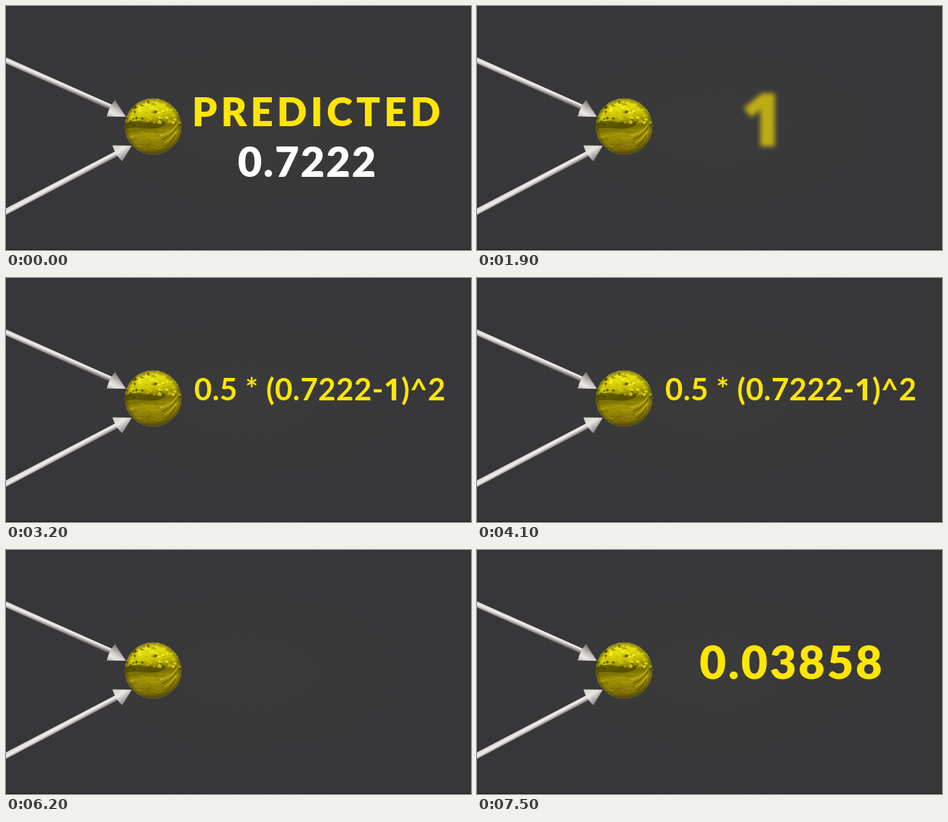
Animation, 640 px wide and 337 px high, one loop 8.5 s. Source, as an HTML page:

```html
<!DOCTYPE html>
<html lang="en">
<head>
<meta charset="utf-8">
<title>Prediction loss</title>
<style>
  html, body { margin: 0; width: 100%; height: 100%; overflow: hidden; background: #363538; }
  svg { display: block; width: 100vw; height: 100vh; }
</style>
</head>
<body>
<svg id="stage" viewBox="0 0 640 337" preserveAspectRatio="none">
  <defs>
    <radialGradient id="bg" cx=".52" cy=".5" r=".6">
      <stop offset="0" stop-color="#3b3b3b"/>
      <stop offset=".55" stop-color="#383739"/>
      <stop offset="1" stop-color="#363639"/>
    </radialGradient>
    <linearGradient id="rodA" gradientUnits="userSpaceOnUse" x1="74.500" y1="104.200" x2="71.500" y2="111.200">
      <stop offset="0" stop-color="#dedada"/>
      <stop offset=".3" stop-color="#f3f0ef"/>
      <stop offset=".55" stop-color="#cfcac9"/>
      <stop offset="1" stop-color="#756d6d"/>
    </linearGradient>
    <linearGradient id="rodB" gradientUnits="userSpaceOnUse" x1="74" y1="241.500" x2="77.800" y2="248.500">
      <stop offset="0" stop-color="#dedada"/>
      <stop offset=".35" stop-color="#f3f0ef"/>
      <stop offset=".6" stop-color="#cbc5c4"/>
      <stop offset="1" stop-color="#786f6f"/>
    </linearGradient>
    <linearGradient id="coneA" gradientUnits="userSpaceOnUse" x1="158" y1="139" x2="147" y2="156">
      <stop offset="0" stop-color="#8f8a89"/>
      <stop offset=".4" stop-color="#d2cecc"/>
      <stop offset=".7" stop-color="#ece8e6"/>
      <stop offset="1" stop-color="#bdb8b6"/>
    </linearGradient>
    <linearGradient id="coneB" gradientUnits="userSpaceOnUse" x1="156" y1="191" x2="168" y2="207">
      <stop offset="0" stop-color="#d8d4d2"/>
      <stop offset=".4" stop-color="#ece8e6"/>
      <stop offset="1" stop-color="#8d8786"/>
    </linearGradient>
    <linearGradient id="gold" x1="0" y1="0" x2=".12" y2="1">
      <stop offset="0" stop-color="#c9c210"/>
      <stop offset=".15" stop-color="#ece50e"/>
      <stop offset=".34" stop-color="#cfc706"/>
      <stop offset=".48" stop-color="#8d8403"/>
      <stop offset=".58" stop-color="#7b7002"/>
      <stop offset=".68" stop-color="#a39506"/>
      <stop offset=".84" stop-color="#8a7c06"/>
      <stop offset="1" stop-color="#6b5d08"/>
    </linearGradient>
    <radialGradient id="rim">
      <stop offset=".86" stop-color="#3c3600" stop-opacity="0"/>
      <stop offset=".97" stop-color="#3c3600" stop-opacity=".5"/>
      <stop offset="1" stop-color="#9a9570" stop-opacity=".7"/>
    </radialGradient>
    <clipPath id="ball"><circle cx="202.5" cy="166.5" r="39"/></clipPath>
  </defs>
  <rect width="640" height="337" fill="url(#bg)"/>
  <rect y="336" width="640" height="1" fill="#1b1b1c"/>

  <path d="M0 71L146 136.500L143 143L0 79.500Z" fill="url(#rodA)"/>
  <path d="M150 130L165 153L138.500 152.500Q142 139 150 130Z" fill="url(#coneA)"/>
  <path d="M0 279.500L151 200.500L154.500 207L0 288.500Z" fill="url(#rodB)"/>
  <path d="M146.500 192.500L173 193L160 214.500Q150 205 146.500 192.500Z" fill="url(#coneB)"/>

  <g clip-path="url(#ball)">
    <circle cx="202.5" cy="166.5" r="39" fill="url(#gold)"/>
    <g id="glints" style="filter:blur(.6px)"></g>
    <circle cx="202.5" cy="166.5" r="39" fill="url(#rim)"/>
  </g>
  <g id="words"></g>
</svg>
<script>
const LOOP = 8500, STEP = 100;
const YELLOW = '#ffe600';
const pen = document.createElement('canvas').getContext('2d');

function add(parent, tag, attrs) {
  const el = document.createElementNS('http://www.w3.org/2000/svg', tag);
  for (const k in attrs) el.setAttribute(k, attrs[k]);
  return document.getElementById(parent).appendChild(el);
}

let seed = 11;
const rnd = () => (seed = seed * 16807 % 2147483647) / 2147483647;

// Reflected foliage: dark leaves thicken towards the horizon and the left rim
for (let i = 0; i < 150; i++) {
  const a = Math.PI * (1 + rnd()), r = 38 * Math.sqrt(rnd());
  const dx = r * Math.cos(a), dy = r * Math.sin(a);
  const dark = rnd() < .35 + dy / 90 - dx / 130;
  add('glints', 'ellipse', {
    cx: 202.5 + dx, cy: 165 + dy, rx: .8 + 2.4 * rnd(), ry: .7 + 1.6 * rnd(),
    fill: dark ? '#4d4700' : ['#f6f02c', '#d5cd08', '#b3aa05'][i % 3], opacity: .75
  });
}
// Ground: dark bank, soft streaks, curved lines at the right
add('glints', 'path', { d: 'M163 163q12 -7 28 -3t30 3q-10 8 -30 6t-28 2z', fill: '#4b4400', opacity: .7 });
for (let i = 0; i < 22; i++) {
  const x = rnd() * 60 - 34, y = 171 + rnd() * 30;
  add('glints', 'path', {
    d: `M${202.5 + x - 8} ${y}q8 ${2 + rnd() * 2} 16 -1`, fill: 'none',
    'stroke-width': .7 + rnd() * 1.4, stroke: ['#b8aa10', '#6d6104', '#a39509'][i % 3], opacity: .5
  });
}
for (let i = 0; i < 4; i++) {
  add('glints', 'path', {
    d: `M${212 + i * 3} ${179 + i * 5}Q${227 + i} ${177 + i * 3} ${236 - i} ${163 + i * 5}`,
    fill: 'none', 'stroke-width': 1.3, stroke: i % 2 ? '#4f4602' : '#d6cc1c', opacity: .75
  });
}

// text, centre x, baseline, size, weight, tracking (em), colour, [in start, end], [out start, end]
const lines = [
  ['PREDICTED', 427, 166, 54.5, 900, .092, YELLOW, null, [100, 550]],
  ['0.7222', 414, 235.5, 57.5, 900, .033, '#fff', null, [100, 550]],
  ['1', 393, 194, 102, 800, 0, YELLOW, [500, 850], [1800, 2100]],
  ['0.5 * (0.7222-1)^2', 432, 169, 42, 700, .008, YELLOW, [2100, 2750], [5600, 6150]],
  ['0.03858', 432, 177.5, 63, 900, .045, YELLOW, [6250, 6950], null]
];
const SPREAD = 10;
const clamp = v => Math.min(1, Math.max(0, v));

// Lato's 1 has a foot, so a footless one stands in for it
const fontOf = ch => ch === '1' ? '"Open Sans", Inter, sans-serif' : 'Lato, Inter, sans-serif';

const glyphs = [];
for (const [str, cx, y, size, weight, track, fill, enter, leave] of lines) {
  const widths = [...str].map(ch => {
    pen.font = `${weight} ${size}px ${fontOf(ch)}`;
    return pen.measureText(ch).width + track * size;
  });
  let x = cx - (widths.reduce((a, b) => a + b) - track * size) / 2;
  [...str].forEach((ch, i) => {
    if (ch !== ' ') {
      const el = add('words', 'text', {
        x, y, fill, 'font-size': size, 'font-weight': weight, 'font-family': fontOf(ch)
      });
      el.textContent = ch;
      glyphs.push({ el, i, n: str.length, enter, leave });
    }
    x += widths[i];
  });
}

// Soft front travelling left to right across the characters
function sweep(t, span, i, n) {
  const head = (t - span[0]) / (span[1] - span[0]) * (n - 1 + SPREAD);
  return clamp((head - i) / SPREAD);
}

function draw(now) {
  const t = Math.floor(now % LOOP / STEP) * STEP;
  for (const { el, i, n, enter, leave } of glyphs) {
    const shown = (enter ? sweep(t, enter, i, n) : 1) * (leave ? 1 - sweep(t, leave, i, n) : 1);
    el.style.opacity = shown;
    el.style.filter = shown > 0 && shown < 1 ? `blur(${(9 * (1 - shown)).toFixed(2)}px)` : 'none';
  }
}

const start = performance.now();
function tick() {
  draw(performance.now() - start);
  requestAnimationFrame(tick);
}
tick();
</script>
</body>
</html>
```
